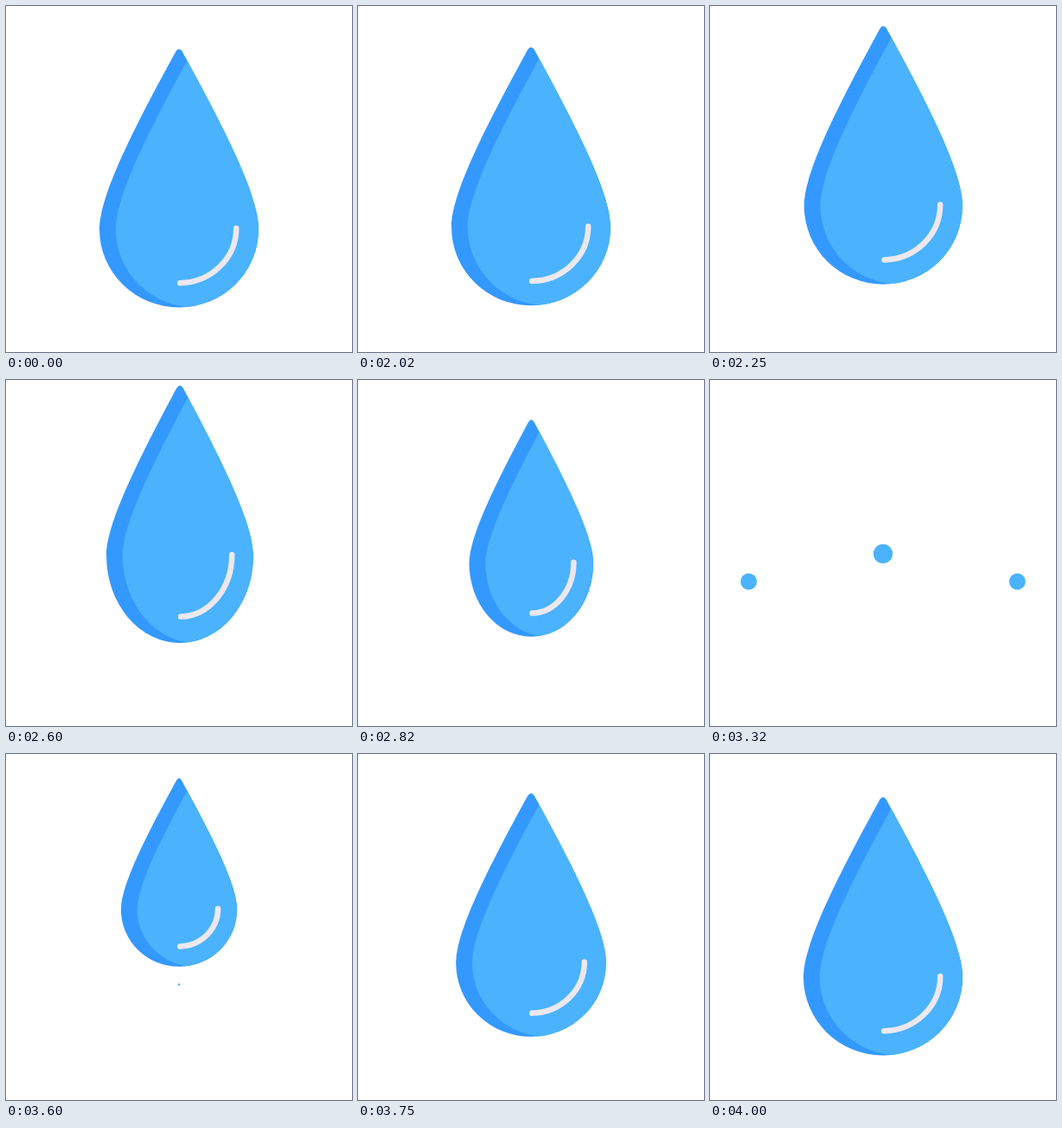
An HTML page that plays this animation: 400x400 px, repeating every 4020 ms.

```html
<!DOCTYPE html>
<html lang="en">
<head>
<meta charset="utf-8">
<title>Water drop</title>
<style>
  html, body { margin: 0; width: 100%; height: 100%; overflow: hidden; background: #fff; }
  svg { display: block; width: 100%; height: 100%; }
</style>
</head>
<body>
<svg viewBox="0 0 400 400">
  <defs><clipPath id="body"><path id="mask"/></clipPath></defs>
  <g id="drop">
    <path id="shade" fill="#3399ff"/>
    <g clip-path="url(#body)"><path id="face" fill="#4bb2fe" transform="translate(18.8 0)"/></g>
    <path id="shine" fill="none" stroke="#ece8ef" stroke-width="6.5" stroke-linecap="round"/>
  </g>
  <g id="splash" fill="#4bb2fe"><circle/><circle/><circle/></g>
</svg>
<script>
const LOOP = 4020, LEAP = 2000, BURST = 3060, SPLASH_END = 3620, ENTER = 3407, REST = 4000;
const CX = 200;
const $ = id => document.getElementById(id);
const drop = $('drop'), splash = $('splash');
const dots = [...splash.children];

// time, tip, widest row, bottom, half width, centre
const leap = [
  [2000, 50, 258, 348.5, 92, 200],
  [2300, 19, 226, 317.5, 91.2, 200.4],
  [2520, 8.5, 208, 306.5, 87.3, 200.9],
  [2600, 6.3, 203, 304, 85, 201],
  [2800, 38, 208, 295, 73.5, 200.4],
  [2970, 132.5, 260.5, 327, 56.5, 199.6],
  [3060, 211, 313, 365, 45, 199.5]
];

function slope(i, k) {
  const a = leap[Math.max(i - 1, 0)], b = leap[Math.min(i + 1, leap.length - 1)];
  return (b[k] - a[k]) / (b[0] - a[0]);
}

// Smooth curve through the leap poses
function leapPose(t) {
  let i = 0;
  while (i < leap.length - 2 && t >= leap[i + 1][0]) i++;
  const a = leap[i], b = leap[i + 1], d = b[0] - a[0], p = (t - a[0]) / d, q = 1 - p;
  return [1, 2, 3, 4, 5].map(k =>
    a[k] * q * q * (1 + 2 * p) + b[k] * p * p * (3 - 2 * p) +
    d * p * q * (slope(i, k) * q - slope(i + 1, k) * p));
}

// Falls in from above the stage while growing
function enterPose(t) {
  const left = Math.max(0, (REST - t) / (REST - ENTER));
  const e = 1 - left ** 3.3, mid = 258 - 289 * (1 - e);
  return [mid - 208 * e, mid, mid + 90.5 * e, 92 * e, CX];
}

function drawDrop([top, mid, bottom, w, cx]) {
  const up = mid - top, low = bottom - mid;
  const x = k => cx + k * w, y = k => mid - k * up;
  const d = `M${x(-1)} ${mid}C${x(-1)} ${y(.19)} ${x(-.56)} ${y(.567)} ${x(-.05)} ${y(.98)}` +
    `Q${cx} ${y(1.02)} ${x(.05)} ${y(.98)}` +
    `C${x(.56)} ${y(.567)} ${x(1)} ${y(.19)} ${x(1)} ${mid}` +
    `A${w} ${low} 0 0 1 ${x(-1)} ${mid}Z`;
  for (const id of ['mask', 'shade', 'face']) $(id).setAttribute('d', d);

  const rx = .85 * w - 12, ry = .8 * low - 9.2, sy = mid - 1;
  $('shine').setAttribute('d', rx > 4 && ry > 4
    ? `M${cx + rx} ${sy}A${rx} ${ry} 0 0 1 ${cx + 1.2} ${sy + ry}` : '');
}

function drawSplash(p) {
  const spread = 169 * (1 - (1 - p) ** 4);
  const high = 289 - 343.5 * p + 331.5 * p * p;
  const wide = 289 - 214.4 * p + 201.9 * p * p;
  const sideSize = 10.7 * Math.max(0, 1 - (p / .96) ** 3);
  dots.forEach((dot, i) => {
    const side = i - 1;
    dot.setAttribute('cx', CX + side * spread);
    dot.setAttribute('cy', side ? wide : high);
    dot.setAttribute('r', side ? sideSize : 12 * (1 - p ** 3.4));
  });
}

function show(el, on) {
  el.style.display = on ? '' : 'none';
}

function render(now) {
  const t = now % LOOP;
  const hidden = t >= BURST && t < ENTER;
  const splashing = t >= BURST && t < SPLASH_END;
  show(drop, !hidden);
  show(splash, splashing);
  if (!hidden) drawDrop(t < BURST ? leapPose(Math.max(t, LEAP)) : enterPose(t));
  if (splashing) drawSplash((t - BURST) / (SPLASH_END - BURST));
}

const start = performance.now();
function tick() {
  render(performance.now() - start);
  requestAnimationFrame(tick);
}
tick();
</script>
</body>
</html>
```
